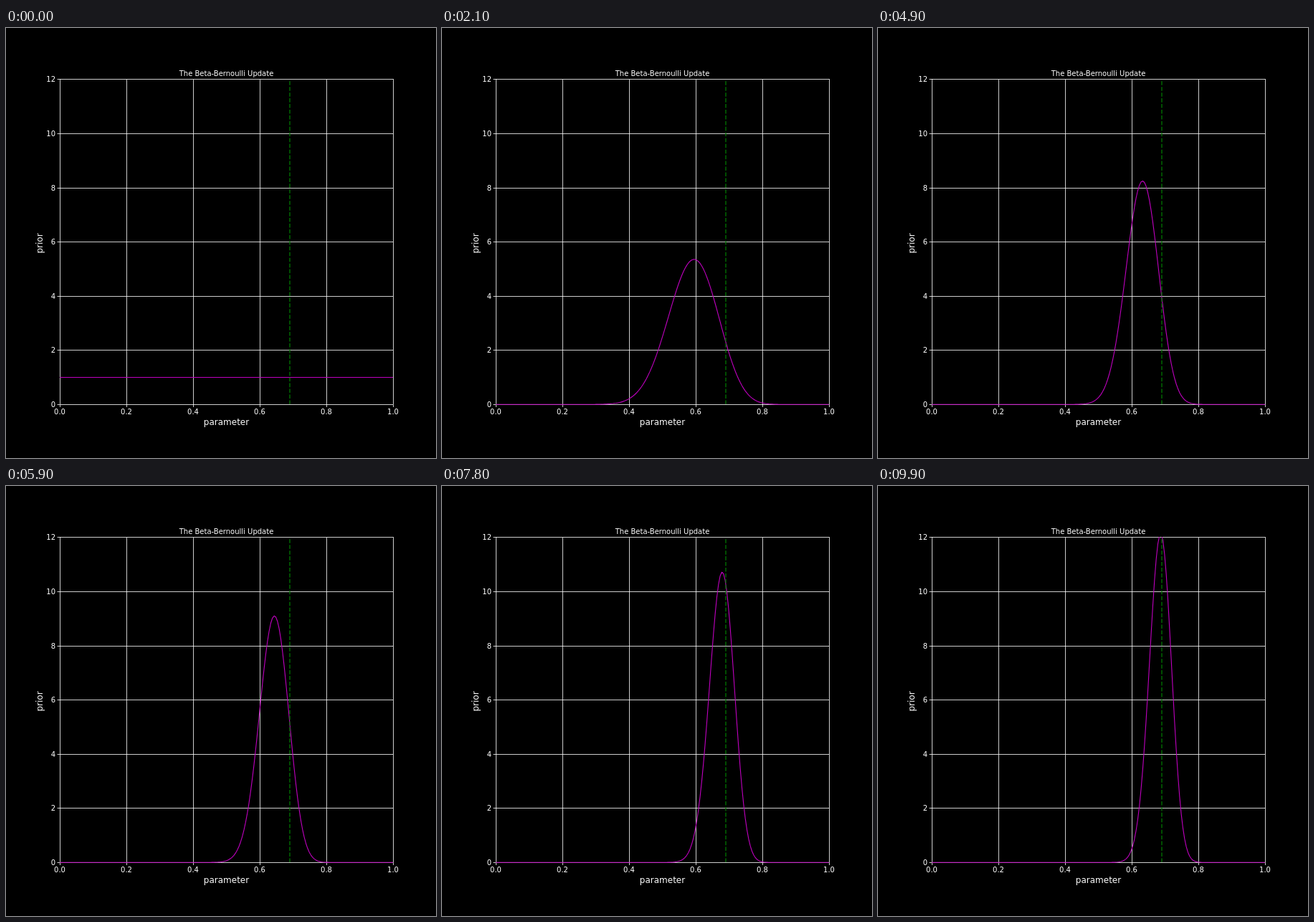
Animation, 600 px wide and 600 px high, one loop 10 s. Source, as an HTML page:

```html
<!DOCTYPE html>
<html lang="en">
<head>
<meta charset="utf-8">
<title>Beta-Bernoulli update</title>
<style>
  html, body { margin: 0; width: 100%; height: 100%; overflow: hidden; background: #000; }
  svg { display: block; width: 600px; height: 600px; }
  text { font: 10px "DejaVu Sans", sans-serif; fill: #fff; text-anchor: middle; }
  .label { font-size: 12px; }
  .y-tick { text-anchor: end; }
  .rule { stroke: #fff; stroke-width: .8; fill: none; }
  #curve { stroke: #bf00bf; stroke-width: 1.1; stroke-linejoin: round; fill: none; }
  #truth { stroke: #008000; stroke-width: 1.2; stroke-dasharray: 5.55 2.4; }
</style>
</head>
<body>
<svg viewBox="0 0 600 600">
  <clipPath id="plot"><rect x="75" y="71" width="465" height="455"/></clipPath>
  <g id="grid"></g>
  <rect class="rule" x="75.5" y="71.5" width="465" height="454"/>
  <g clip-path="url(#plot)">
    <path id="curve"/>
    <path id="truth" d="M396 525V72"/>
  </g>
  <text x="307.5" y="67">The Beta-Bernoulli Update</text>
  <text class="label" x="307.5" y="554">parameter</text>
  <text class="label" transform="translate(51 300.5) rotate(-90)">prior</text>
</svg>
<script>
  const LEFT = 75, BOTTOM = 525.25, WIDTH = 465, HEIGHT = 453.3, Y_MAX = 12;
  const FRAMES = 100, FRAME_MS = 100, SAMPLES = 200, TRIALS_PER_FRAME = 2;

  // [frame, successes so far]
  const TALLY = [
    [0, 0], [11, 16], [21, 25], [22, 26], [33, 40], [35, 44], [44, 56],
    [49, 62], [55, 70], [66, 86], [68, 90], [77, 104], [88, 121], [99, 136]
  ];

  const grid = document.getElementById('grid');
  const curve = document.getElementById('curve');
  const toX = v => LEFT + v * WIDTH;
  const toY = v => BOTTOM - v / Y_MAX * HEIGHT;

  function add(tag, attrs, content = '') {
    const el = document.createElementNS('http://www.w3.org/2000/svg', tag);
    for (const name in attrs) el.setAttribute(name, attrs[name]);
    el.textContent = content;
    grid.append(el);
  }

  // Grid lines sit on pixel centres to stay crisp
  function drawGrid() {
    for (let i = 0; i <= 5; i++) {
      const x = Math.round(toX(i / 5));
      const inner = i > 0 && i < 5;
      add('path', { class: 'rule', d: `M${x + .5} ${inner ? 72 : 526}V529` });
      add('text', { x, y: 539 }, (i / 5).toFixed(1));
    }
    for (let v = 0; v <= Y_MAX; v += 2) {
      const y = Math.floor(toY(v));
      const inner = v > 0 && v < Y_MAX;
      add('path', { class: 'rule', d: `M71.5 ${y + .5}H${inner ? 540 : 75}` });
      add('text', { class: 'y-tick', x: 69, y: y + 4 }, v);
    }
  }

  function successes(frame) {
    const i = Math.max(1, TALLY.findIndex(([f]) => f >= frame));
    const [f0, s0] = TALLY[i - 1], [f1, s1] = TALLY[i];
    return Math.round(s0 + (s1 - s0) * (frame - f0) / (f1 - f0));
  }

  // Density of Beta(hits + 1, misses + 1)
  function betaPdf(hits, misses) {
    let scale = hits + misses + 1;
    for (let k = 1; k <= misses; k++) scale *= (hits + k) / k;
    return x => scale * x ** hits * (1 - x) ** misses;
  }

  function drawCurve(frame) {
    const hits = successes(frame);
    const pdf = betaPdf(hits, frame * TRIALS_PER_FRAME - hits);
    const points = Array.from({ length: SAMPLES }, (_, i) => {
      const x = i / (SAMPLES - 1);
      return `${toX(x).toFixed(2)} ${toY(pdf(x)).toFixed(2)}`;
    });
    curve.setAttribute('d', 'M' + points.join('L'));
  }

  const start = performance.now();
  let shown = -1;

  function tick() {
    const elapsed = performance.now() - start;
    const frame = Math.floor(elapsed / FRAME_MS) % FRAMES;
    if (frame !== shown) drawCurve(shown = frame);
    requestAnimationFrame(tick);
  }

  drawGrid();
  tick();
</script>
</body>
</html>
```
